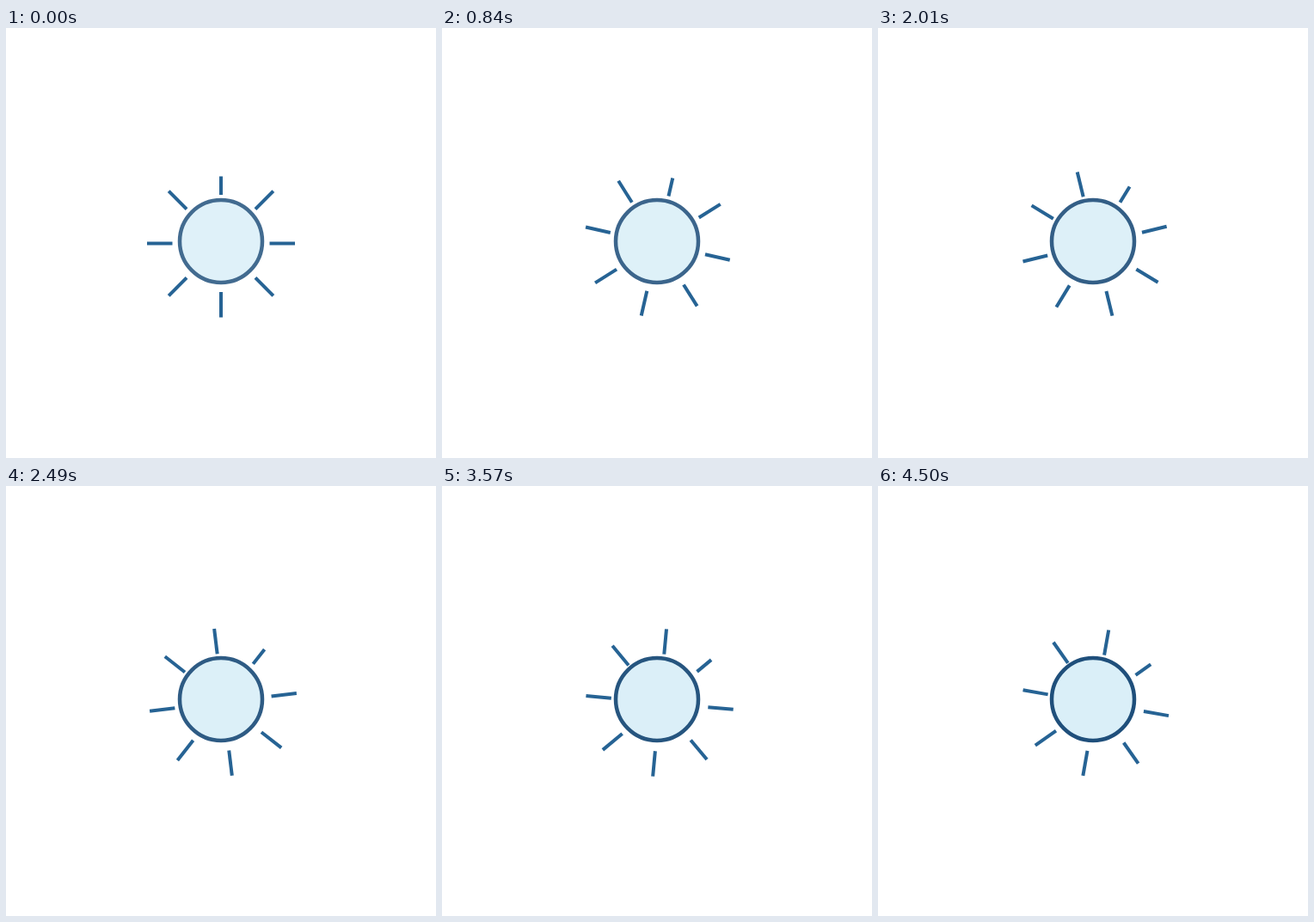
An HTML page for the animation above (4.56 s loop, 500 by 500 pixels).

```html
<!DOCTYPE html>
<html lang="en">
<head>
<meta charset="utf-8">
<title>Sun</title>
<style>
  html, body { margin: 0; width: 100%; height: 100%; overflow: hidden; background: #fff; }
  svg { display: block; width: 100vw; height: 100vh; }
</style>
</head>
<body>
<svg viewBox="0 0 500 500">
  <g id="rays" stroke="#266394" stroke-width="4"></g>
  <circle id="disc" cx="250" cy="248" r="48" fill="#daeff8" stroke="#1f4f7b" stroke-width="4.5"/>
</svg>
<script>
const LOOP = 4560, STEP = 30, LAST = 4500, SPIN = 4535, TURN = 55;
const rays = document.getElementById('rays');
const disc = document.getElementById('disc');

// Eight rays; the top one is shorter, so the pivot sits below their centre.
for (let i = 0; i < 8; i++) {
  const ray = document.createElementNS('http://www.w3.org/2000/svg', 'line');
  const attrs = {
    x1: 250, x2: 250, y1: 250.5 - 56.5, y2: 250.5 - (i ? 86 : 78),
    transform: `rotate(${i * 45} 250 250.5)`
  };
  for (const name in attrs) ray.setAttribute(name, attrs[name]);
  rays.appendChild(ray);
}

const bezier = (a, b, s) => 3 * a * s * (1 - s) ** 2 + 3 * b * s * s * (1 - s) + s ** 3;

function ease(x) {
  let lo = 0, hi = 1;
  for (let i = 0; i < 24; i++) {
    const mid = (lo + hi) / 2;
    if (bezier(0.167, 0.667, mid) < x) lo = mid; else hi = mid;
  }
  return bezier(0.167, 1, (lo + hi) / 2);
}

function draw(ms) {
  const t = Math.min(Math.floor((ms % LOOP) / STEP) * STEP, LAST) / SPIN;
  rays.setAttribute('transform', `rotate(${TURN * ease(t)} 250 254.5)`);
  disc.setAttribute('opacity', 0.84 + 0.16 * t);
}

let start;
function tick(now) {
  start ??= now;
  draw(Math.max(0, now - start));
  requestAnimationFrame(tick);
}
draw(0);
requestAnimationFrame(tick);
</script>
</body>
</html>
```
